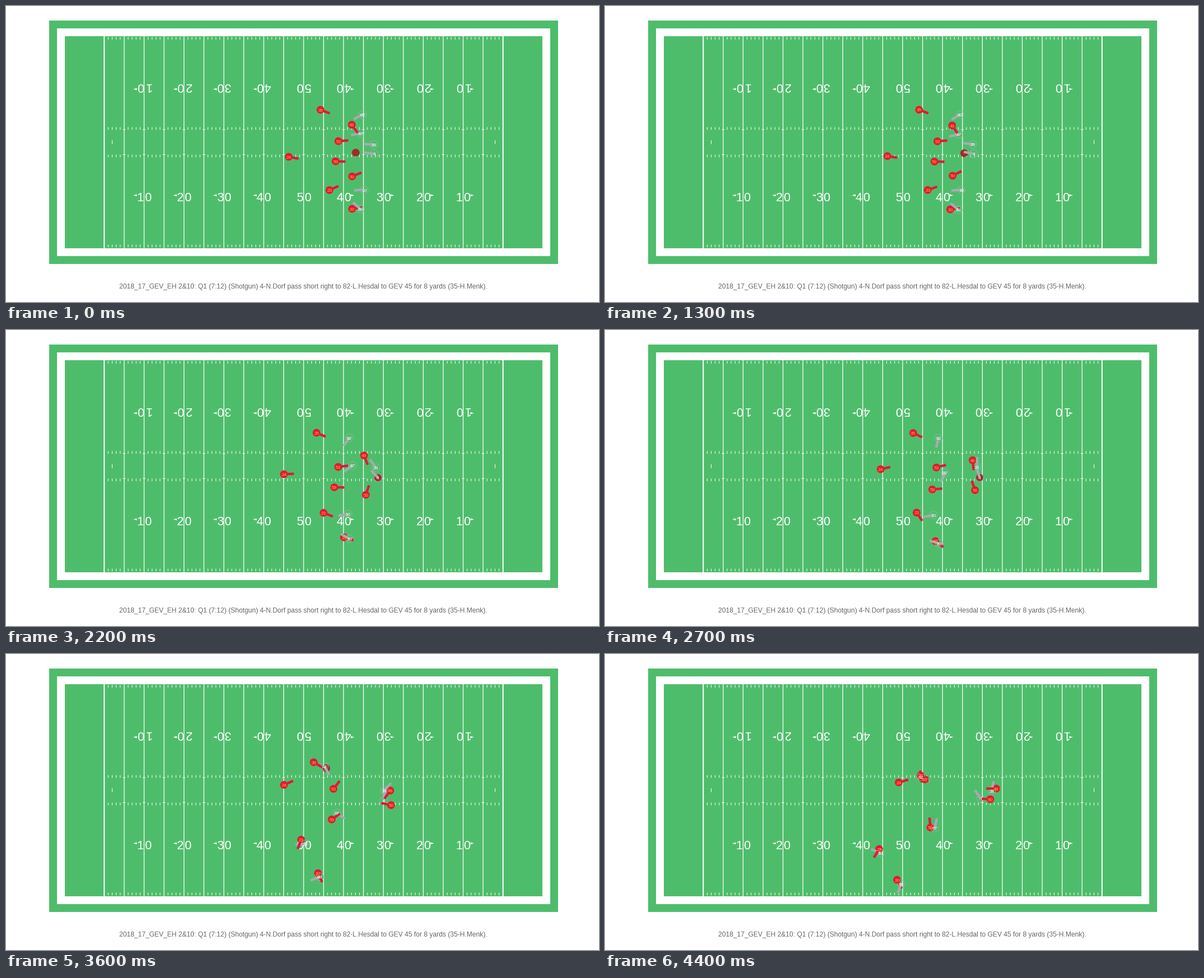
Animation of 1058x529 px, one loop 4500 ms. Source, as a matplotlib script:

```python
import numpy as np
import matplotlib.pyplot as plt
from matplotlib.animation import FuncAnimation
from matplotlib.patches import Circle, Polygon, Rectangle

W, H, DPI = 1058, 529, 100
FRAMES, INTERVAL = 45, 100
PT = 72 / DPI

GREEN, RED, GOLD = "#4ebd6b", "#e31837", "#ffb612"
SILVER, BROWN = "#a5acaf", "#a52a2a"
MID, YARD = 531, 7.115
RADIUS, REACH = 6.9, 17.8

# frames at which the play changes
SNAP, HELD, THROW, CATCH, LAST = 11, 15, 28, 36, FRAMES - 1
BREAK = 31
CREEP = 0.03  # share of the first leg covered before the snap

plt.rcParams["font.family"] = "Liberation Sans"
fig = plt.figure(figsize=(W / DPI, H / DPI), dpi=DPI, facecolor="white")
ax = fig.add_axes([0, 0, 1, 1])
ax.set_xlim(0, W)
ax.set_ylim(H, 0)
ax.axis("off")


def box(x0, y0, x1, y1, color):
    ax.add_patch(Rectangle((x0, y0), x1 - x0, y1 - y0, fc=color, ec="none", zorder=0))


def line(x0, y0, x1, y1, width=1.0):
    ax.plot([x0, x1], [y0, y1], color="white", lw=width * PT, snap=False,
            solid_capstyle="butt", zorder=1)


def text(x, y, s, size, color, turn=0, z=2):
    return ax.text(x, y, s, fontsize=size * PT, color=color, ha="center",
                   va="baseline", rotation=turn, rotation_mode="anchor", zorder=z)


def yard_x(yard):
    return MID + (yard - 50) * YARD


def draw_number(x, number, side, y, sign):
    """Two spaced digits and a goal arrow; sign -1 turns them upside down."""
    for digit, dx in zip(str(number), (-6.8, 6.8)):
        text(x + sign * dx, y + sign * 7.6, digit, 21.8, "white", 90 - 90 * sign)
    if side:
        ya = y - sign * 3
        base, tip = x + side * 12.8, x + side * 19.3
        ax.add_patch(Polygon([(base, ya - 1.9), (base, ya + 1.9), (tip, ya)],
                             fc="white", ec="none", zorder=2))


def draw_field():
    for inset, color in ((0, GREEN), (14, "white"), (28, GREEN)):
        box(77 + inset, 26 + inset, 985 - inset, 461 - inset, color)
    for yard in range(101):
        x = yard_x(yard)
        if yard % 5:
            for y in (55.3, 216.5, 265.6, 426.5):
                line(x, y, x, y + 4.7)
        elif 0 < yard < 100:
            line(x, 54, x, 433, 1.25)
            for y in (220.8, 265.6):
                line(x - 2.4, y, x + 2.4, y)
        else:
            line(x, 54, x, 433, 2)
    for yard in (2, 98):
        line(yard_x(yard), 240, yard_x(yard), 246.8)
    for yard in range(10, 100, 10):
        for y, sign in ((341.4, 1), (145.6, -1)):
            draw_number(yard_x(yard), min(yard, 100 - yard), np.sign(yard - 50), y, sign)


class Player:
    """Poses are (x, y, facing in degrees) at the snap, the break and the whistle."""

    def __init__(self, number, home, start, mid, end):
        start, mid, end = (np.array(p, float) for p in (start, mid, end))
        self.start, self.creep = start, CREEP * (mid - start)
        # from rest at the snap: a u^2 + b u^3 through both later poses
        leg, whole = mid - start - self.creep, end - start - self.creep
        k = (BREAK - SNAP) / (LAST - SNAP)
        self.a = (leg - k ** 3 * whole) / (k ** 2 - k ** 3)
        self.b = whole - self.a

        self.dot = Circle((0, 0), RADIUS, fc=RED if home else "none",
                          ec="none" if home else SILVER, lw=0.8 * PT,
                          zorder=4 if home else 5)
        ax.add_patch(self.dot)
        self.arm, = ax.plot([], [], color=RED if home else SILVER, lw=4.4 * PT,
                            snap=False, solid_capstyle="butt", zorder=6)
        self.label = text(0, 0, str(number), 8.5, GOLD if home else "white",
                          z=7 if home else 8)

    def pose(self, t):
        u = max(t - SNAP, 0) / (LAST - SNAP)
        return (self.start + self.creep * min(t / SNAP, 1)
                + self.a * u ** 2 + self.b * u ** 3)

    def move(self, t):
        x, y, angle = self.pose(t)
        a = np.radians(angle)
        self.dot.center = x, y
        self.arm.set_data([x, x + REACH * np.cos(a)], [y, y + REACH * np.sin(a)])
        self.label.set_position((x, y + 3.1))


draw_field()
text(530.5, 505, "2018_17_GEV_EH 2&10: Q1 (7:12) (Shotgun) 4-N.Dorf pass short right to "
     "82-L.Hesdal to GEV 45 for 8 yards (35-H.Menk).", 12, "#666666")

passer = Player(4, False, (657, 264, 186), (671.5, 263, 270), (670, 258, 236))
catcher = Player(82, False, (636, 194, 152), (581.5, 195, 85), (563.5, 219.5, 27))
players = [
    passer,
    catcher,
    Player(87, False, (633, 227.5, 170), (598.5, 267.5, 86), (588, 311, -76)),
    Player(28, False, (656, 247.5, 182), (668, 244, 296), (690, 245, 280)),
    Player(10, False, (639, 328.5, 177), (563.5, 333.5, 170), (491.5, 355.5, 202)),
    Player(20, True, (617.5, 362.5, -8), (576, 383.5, 52), (521, 403.5, 62)),
    Player(88, False, (632.5, 363, 222), (580.5, 389, 182), (528.5, 410.5, 110)),
    Player(35, True, (561, 185.5, 21), (548, 186.5, 28), (563, 217, 38)),
    Player(49, True, (617, 212.3, 54), (670, 239, 100), (698, 240.5, 180)),
    Player(53, True, (593, 241.5, -4), (589, 245, -27), (570.5, 224, -120)),
    Player(24, True, (504.5, 269.5, 11), (491, 241.5, -19), (524, 229.5, -16)),
    Player(59, True, (588, 277.5, 2), (582.5, 289, -14), (580.5, 310, -95)),
    Player(50, True, (617.5, 304.5, -22), (674, 279, -138), (687.5, 259.5, -178)),
    Player(23, True, (577, 329, -24), (544.5, 327.5, 83), (489, 348.5, 121)),
]

SPOT = np.array((624, 262))
ball = Circle(SPOT, RADIUS, fc=BROWN, ec="none", zorder=3)
ax.add_patch(ball)


def ball_at(t):
    """On the ground, snapped to the passer, thrown, then carried."""
    hand = passer.pose(t)[:2]
    catch = catcher.pose(t)[:2] + 3.5
    snapped = np.clip((t - SNAP) / (HELD - SNAP), 0, 1)
    thrown = np.clip((t - THROW) / (CATCH - THROW), 0, 1)
    held = SPOT + (hand - SPOT) * snapped
    return held + (catch - held) * thrown


def update(frame):
    ball.center = ball_at(frame)
    for player in players:
        player.move(frame)
    return []


anim = FuncAnimation(fig, update, frames=FRAMES, interval=INTERVAL, repeat=True,
                     repeat_delay=0, blit=False)
plt.show()
```
